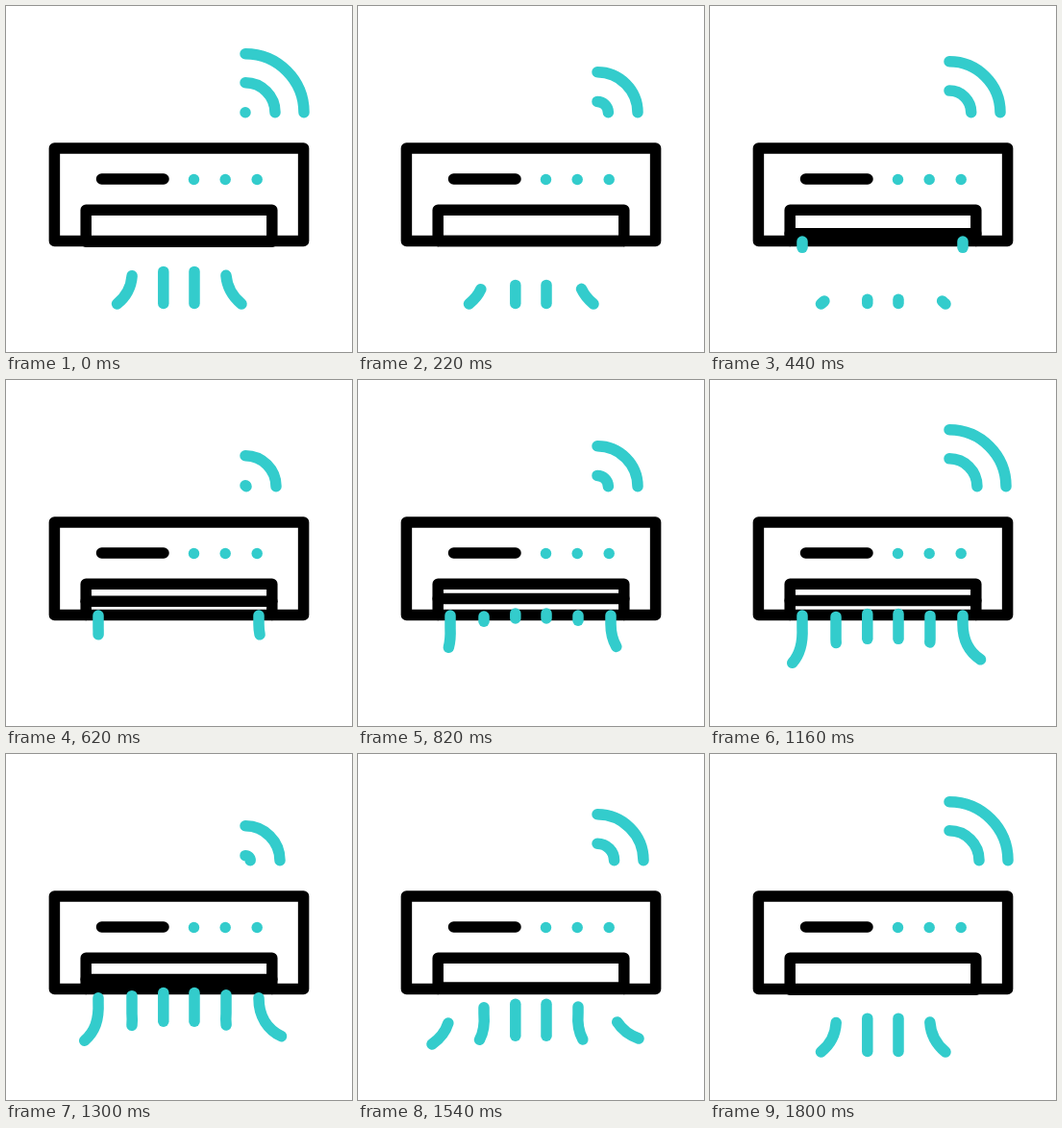
An HTML page that plays this animation: 360 by 360 pixels, repeating every 1.82 s.

```html
<!DOCTYPE html>
<html lang="en">
<head>
<meta charset="utf-8">
<title>Air conditioner</title>
<style>
  html, body { margin: 0; width: 100%; height: 100%; overflow: hidden; background: #fff; }
  svg { display: block; width: 100vw; height: 100vh; }
  .line { fill: none; stroke: #000; stroke-width: 11.5; stroke-linecap: round; stroke-linejoin: round; }
  .air { stroke: #33cccc; }
</style>
</head>
<body>
<svg viewBox="0 0 360 360">
  <g class="line">
    <path d="M50.4 148H309.6V244.5H50.4Z"/>
    <path d="M83.2 244.5V212.3H276.8V244.5"/>
    <path d="M99.5 180H164"/>
    <path id="flap" d="M83.2 0H276.8"/>
  </g>
  <g fill="#33cccc">
    <circle cx="195.5" cy="180.5" r="5.7"/>
    <circle cx="228.2" cy="180.5" r="5.7"/>
    <circle cx="261.2" cy="180.5" r="5.7"/>
  </g>
  <path id="signal" class="line air"/>
  <g id="outer" class="line air">
    <path pathLength="1" d="M96 245V258C97 280 91 292 77 302"/>
    <path pathLength="1" d="M263 245V254C263 276 275 290 292 296"/>
  </g>
  <g id="inner" class="line air">
    <path pathLength="1" d="M131 246V270C132.5 288 128 300 115.5 310"/>
    <path pathLength="1" d="M163.8 243V309.5"/>
    <path pathLength="1" d="M196 243V309.5"/>
    <path pathLength="1" d="M229 245V270C227.5 288 233 300 245 310"/>
  </g>
</svg>
<script>
const LOOP = 1820, STEP = 20, PULSE = 600;
const byId = id => document.getElementById(id);
const flap = byId('flap'), signal = byId('signal');
const outer = byId('outer').children, inner = byId('inner').children;

const clamp = x => Math.min(1, Math.max(0, x));
const ramp = (t, start, end) => clamp((t - start) / (end - start));
const easeIn = (p, power) => p ** power;
const easeOut = (p, power) => 1 - (1 - p) ** power;

// Shows only the part of each path between tail and head, both 0 to 1.
function trim(paths, tail, head) {
  const length = head - tail;
  for (const path of paths) {
    path.style.display = length > 0 ? '' : 'none';
    path.setAttribute('stroke-dasharray', `${Math.max(length, 0)} 2`);
    path.setAttribute('stroke-dashoffset', -tail);
  }
}

function quarterArc(radius) {
  const r = Math.max(radius, .01);
  return `M249 ${110.8 - r}A${r} ${r} 0 0 1 ${249 + r} 110.8`;
}

function draw(time) {
  const t = Math.floor((time % LOOP) / STEP) * STEP;

  // The flap rises, rests and falls symmetrically around 900 ms.
  const lift = ramp(Math.abs(t - 900), 700, 200);
  flap.setAttribute('transform', `translate(0 ${245.2 - 17.7 * lift})`);

  const pulse = t === 3 * PULSE ? 1 : (t % PULSE) / PULSE;
  const radii = [31 * pulse, 31 + 30 * pulse];
  if (t === 0) radii.push(61);
  signal.setAttribute('d', radii.map(quarterArc).join(''));

  trim(outer, ramp(t, 1220, 1800), easeOut(ramp(t, 360, 1540), 1.5));
  // The inner streams finish early in the following loop.
  const late = t < 540 ? t + LOOP : t;
  trim(inner, easeIn(ramp(late, 1140, 2320), 1.25), ramp(late, 740, 1800));
}

const start = performance.now();
function tick() {
  draw(performance.now() - start);
  requestAnimationFrame(tick);
}
tick();
</script>
</body>
</html>
```
